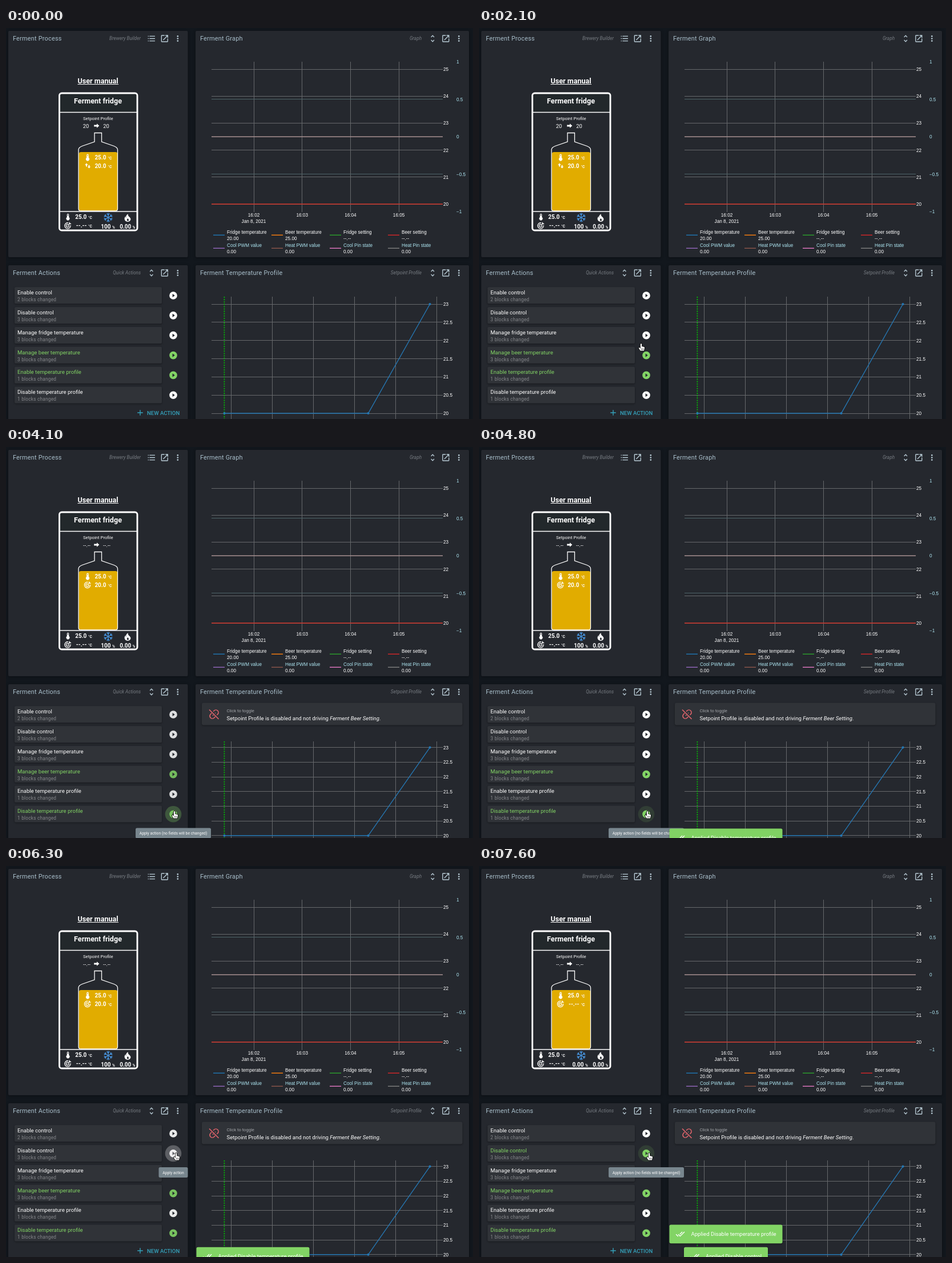
These frames come from a looping animation (818x684 px, 8 s). An HTML page with a canvas:

```html
<!DOCTYPE html>
<html lang="en">
<head>
<meta charset="utf-8">
<title>Ferment dashboard</title>
<style>
  html, body { margin: 0; width: 100%; height: 100%; overflow: hidden; background: #12171d; }
  canvas { display: block; }
</style>
</head>
<body>
<canvas id="stage" width="818" height="684"></canvas>
<script>
const ctx = document.getElementById('stage').getContext('2d');
const LOOP = 8000, STEP = 100;
const APPLY_PROFILE = 3900, APPLY_CONTROL = 6500, COOL_OFF = 6900;
const GREEN = '#82d465', CARD = '#25282e', ITEM = '#303338', PALE = '#a9bfcb', CYAN = '#aee6f2', GRID = '#66686b';
const ROBOTO = 'Roboto, sans-serif', ARIAL = '"Liberation Sans", Arial, sans-serif';

const ICONS = {
  open: 'M14 3V5H17.59L7.76 14.83L9.17 16.24L19 6.41V10H21V3M19 19H5V5H12V3H5C3.89 3 3 3.9 3 5V19A2 2 0 0 0 5 21H19A2 2 0 0 0 21 19V12H19Z',
  unfold: 'M12 5.83L15.17 9L16.58 7.59L12 3L7.41 7.59L8.83 9ZM12 18.17L8.83 15L7.42 16.41L12 21L16.59 16.41L15.17 15Z',
  list: 'M3 5h2v2H3zM3 11h2v2H3zM3 17h2v2H3zM7 5h14v2H7zM7 11h14v2H7zM7 17h14v2H7z',
  play: 'M2 12A10 10 0 1 0 22 12A10 10 0 1 0 2 12ZM10 16.5V7.5L16 12Z',
  thermometer: 'M15 13V5A3 3 0 0 0 9 5V13A5 5 0 1 0 15 13M12 4A1 1 0 0 1 13 5V8H11V5A1 1 0 0 1 12 4Z',
  right: 'M2 15V9H12V4L21 12L12 20V15Z',
  swap: 'M7 2L1 9h4v6h4V9h4zM17 22l6-7h-4V9h-4v6h-4z',
  checks: 'M18 7l-1.41-1.41-6.34 6.34 1.41 1.41zM22.24 5.59L11.66 16.17 7.48 12l-1.41 1.41L11.66 19l12-12zM.41 13.41L6 19l1.41-1.41L1.83 12z',
  fire: 'M13 2C7 6 8 10 8.5 13C7 12 7 10 7.2 8C4 11 4 14 4.3 16C5 20 8 22 12 22C17 22 20 19 19.8 15C19.5 10 12 9 13 2ZM12 20C9 19 10 16 13 13C13 15 15 16 15 18C15 19 14 20 12 20Z',
  link: 'M11 7H7a5 5 0 0 0 0 10h4M13 7h4a5 5 0 0 1 0 10h-4M8 12h8',
  plus: 'M19 13H13V19H11V13H5V11H11V5H13V11H19Z'
};
for (const name in ICONS) ICONS[name] = new Path2D(ICONS[name]);

const ARROW = new Path2D('M0 0V11L2.6 8.6L4.4 12.3L6 11.5L4.3 8H7.8Z');
const HAND = new Path2D('M-1.2 1Q0 -.8 1.2 1V5L5.6 6Q6.2 6.4 6 8L5 12.4H-1.5L-4 8.4Q-4.6 6.8 -3 7L-1.2 8.4Z');

const actions = [
  ['Enable control', 2], ['Disable control', 3], ['Manage fridge temperature', 3],
  ['Manage beer temperature', 3], ['Enable temperature profile', 1], ['Disable temperature profile', 1]
];
// row, hover start, hover end
const hovers = [[4, 2300, 2800], [5, 2900, 4900], [4, 5000, 5100], [3, 5200, 5300], [2, 5350, 5550], [1, 5700, 9000]];
// time, x, y of the pointer's hot spot
const route = [
  [900, 200, 12], [1200, 70, 120], [1400, 12, 260], [1700, 51, 372], [1800, 100, 412],
  [2100, 284, 552], [2200, 292, 585], [2400, 294, 604], [2700, 294, 604], [2900, 298, 622],
  [3100, 300, 637], [3200, 300, 637], [3300, 295, 637], [4800, 295, 637], [5000, 296, 606],
  [5200, 298, 567], [5500, 303, 535], [5600, 303, 522], [5800, 298, 502], [8000, 298, 502]
];

const clamp = v => Math.max(0, Math.min(1, v));
const crisp = v => Math.floor(v) + .5;
const rowY = i => 468 + 34.85 * i;

// CSS "ease": cubic-bezier(.25, .1, .25, 1)
function ease(x) {
  x = clamp(x);
  let lo = 0, hi = 1, s = x;
  for (let i = 0; i < 20; i++) {
    s = (lo + hi) / 2;
    const bx = .75 * s * (1 - s) + s ** 3;
    if (bx < x) lo = s; else hi = s;
  }
  return .3 * s * (1 - s) ** 2 + 3 * s * s * (1 - s) + s ** 3;
}

function text(str, x, y, size, color = '#fff', { style = '', font = ROBOTO, align = 'left', spacing = 0 } = {}) {
  ctx.font = `${style} ${size}px ${font}`;
  ctx.letterSpacing = spacing + 'px';
  ctx.textAlign = align;
  ctx.fillStyle = color;
  ctx.fillText(str, x, y);
  return ctx.measureText(str).width;
}

function box(x, y, w, h, r, fill, shadow = 0) {
  ctx.save();
  if (shadow) {
    ctx.shadowColor = 'rgba(0,0,0,.4)';
    ctx.shadowBlur = shadow;
    ctx.shadowOffsetY = 1;
  }
  ctx.beginPath();
  ctx.roundRect(x, y, w, h, r);
  ctx.fillStyle = fill;
  ctx.fill();
  ctx.restore();
}

function disc(x, y, r, fill) {
  ctx.beginPath();
  ctx.arc(x, y, r, 0, 7);
  ctx.fillStyle = fill;
  ctx.fill();
}

function line(points, color, width = 1, dash = []) {
  ctx.beginPath();
  points.forEach(([x, y]) => ctx.lineTo(x, y));
  ctx.strokeStyle = color;
  ctx.lineWidth = width;
  ctx.setLineDash(dash);
  ctx.stroke();
  ctx.setLineDash([]);
}
const hline = (y, x0, x1, color, width) => line([[x0, y], [x1, y]], color, width);
const vline = (x, y0, y1, color, width, dash) => line([[x, y0], [x, y1]], color, width, dash);

function icon(name, x, y, size, color) {
  ctx.save();
  ctx.translate(x - size / 2, y - size / 2);
  ctx.scale(size / 24, size / 24);
  ctx.fillStyle = color;
  ctx.fill(ICONS[name], 'evenodd');
  ctx.restore();
}

function targetIcon(x, y) {
  ctx.strokeStyle = '#fff';
  ctx.lineWidth = 1.3;
  for (const r of [5.1, 2.6]) {
    ctx.beginPath();
    ctx.arc(x - .5, y + .5, r, -.15, 4.9);
    ctx.stroke();
  }
  line([[x - .5, y + .5], [x + 4, y - 4]], '#fff', 1.3);
  line([[x + 2.6, y - 5.6], [x + 2.6, y - 2.6], [x + 5.6, y - 2.6]], '#fff', 1.3);
}

function snowflake(x, y) {
  ctx.save();
  ctx.translate(x, y);
  for (let i = 0; i < 6; i++) {
    line([[0, 0], [0, -8]], '#4a9be8', 1.2);
    line([[-2.5, -7], [0, -4.6], [2.5, -7]], '#4a9be8', 1.2);
    ctx.rotate(Math.PI / 3);
  }
  ctx.restore();
}

function card(x, y, w, title, kind, kindEnd, firstIcon) {
  box(x, y, w, y < 100 ? 396 : 300, 2, CARD, 5);
  text(title, x + 8, y + 17, 10.93, PALE, { spacing: .2 });
  text(kind, kindEnd, y + 16, 8.2, '#777c82', { style: 'italic', align: 'right' });
  const right = x + w - 17.7, cy = y + 13.5;
  icon(firstIcon, right - 46, cy, 16.4, '#b9ccd6');
  icon('open', right - 23, cy, 16.4, '#b9ccd6');
  for (const dy of [-4.1, 0, 4.1]) disc(right, cy + dy, 1.37, '#b9ccd6');
}

function reading(value, unit, x, y, unitX) {
  text(value, x, y, 10, '#fff', { style: 'bold', align: 'right' });
  text(unit, unitX, y, 6.5, '#fff', { style: 'bold' });
}

function drawProcess(t) {
  card(4, 5, 314.5, 'Ferment Process', 'Brewery Builder', 236, 'list');
  text('User manual', 161, 97, 12.6, '#fff', { style: 'bold', align: 'center' });
  hline(98.5, 125.5, 197, '#fff', 1);

  box(93, 113.5, 137, 34, 4, '#22282b');
  ctx.strokeStyle = '#fff';
  ctx.lineWidth = 2.9;
  ctx.beginPath();
  ctx.roundRect(93.5, 114, 136.5, 240, 4);
  ctx.stroke();
  hline(147.5, 94, 229.5, '#fff', 1.7);
  hline(321, 94, 229.5, '#fff', 1.7);
  text('Ferment fridge', 161, 132, 12.6, '#fff', { style: 'bold', align: 'center' });

  const driving = t < APPLY_PROFILE;
  const setpoint = driving ? '20' : '--.--';
  text('Setpoint Profile', 161.3, 160.5, 7.73, '#fff', { align: 'center' });
  text(setpoint, driving ? 140 : 141.5, 174.5, 9.4, '#fff', { align: 'center' });
  text(setpoint, driving ? 175.5 : 176.5, 174.5, 9.4, '#fff', { align: 'center' });
  icon('right', 159, 171, 11.5, '#fff');

  box(127.5, 217, 68, 103, 4, '#e1ac00');
  ctx.strokeStyle = '#fff';
  ctx.lineWidth = 1.3;
  ctx.stroke(new Path2D('M155 183.5H167.5V199L189 206.5Q195.5 209 195.5 213V316Q195.5 320 191.5 320H131Q127 320 127 316V213Q127 209 133.5 206.5L155 199Z'));

  icon('thermometer', 143, 226.5, 14.5, '#fff');
  if (driving) icon('swap', 143.2, 241, 11, '#fff'); else targetIcon(143, 241);
  reading('25.0', '°C', 175.5, 229.7, 178.5);
  reading(t < APPLY_CONTROL ? '20.0' : '--.--', '°C', 175.5, 244.5, 178.5);

  icon('thermometer', 108.5, 330.5, 14, '#fff');
  targetIcon(108.5, 345.3);
  reading('25.0', '°C', 141.3, 334.2, 144);
  reading('--.--', '°C', 141.3, 348.7, 144);
  snowflake(179, 331.5);
  icon('fire', 213, 332, 16.5, '#fff');
  reading(t < COOL_OFF ? '100' : '0.00', '%', 183.5, 351.3, 186);
  reading('0.00', '%', 219.3, 351.3, 221.5);
}

function drawGraph() {
  const label = (s, x, y, color, align) => text(s, x, y, 8.2, color, { font: ARIAL, align });
  card(332, 5, 479, 'Ferment Graph', 'Graph', 728, 'unfold');
  for (let i = 0; i < 4; i++) {
    const x = 434 + i * 84.7;
    vline(crisp(x), 59, 322, GRID);
    label('16:0' + (i + 2), x, 330.3, '#fff', 'center');
  }
  label('Jan 8, 2021', 434, 341.2, '#fff', 'center');
  for (let i = 0; i < 6; i++) {
    const y = 72 + i * 47.2;
    hline(crisp(y), 360, 765, GRID);
    label(String(25 - i), 766, y + 3, '#fff');
  }
  ['1', '0.5', '0', '−0.5', '−1'].forEach((s, i) => {
    const y = 59.3 + i * 65.45;
    if (i % 2) hline(crisp(y), 360, 765, '#4d6468');
    label(s, 789, y + 3, CYAN);
  });
  hline(190.3, 360, 765, '#a78f90', 1.5);
  hline(308, 360, 765, '#cf3328', 1.6);

  const legend = [
    ['Fridge temperature', '20.00', '#1f77b4'], ['Beer temperature', '25.00', '#ff7f0e'],
    ['Fridge setting', '--.--', '#2ca02c'], ['Beer setting', '--.--', '#d62728'],
    ['Cool PWM value', '0.00', '#9467bd'], ['Heat PWM value', '0.00', '#8c564b'],
    ['Cool Pin state', '0.00', '#e377c2'], ['Heat Pin state', '0.00', '#7f7f7f']
  ];
  legend.forEach(([name, value, color], i) => {
    const x = 363 + (i % 4) * 102, y = i < 4 ? 362.3 : 385.3;
    hline(y, x, x + 20, color, 1.4);
    label(name, x + 24, y - 2.3, i < 4 ? '#fff' : CYAN);
    label(value, x + 24, y + 8.7, '#fff');
  });
}

function drawBanner() {
  box(343, 447.5, 456.5, 39, 3, ITEM, 3);
  ctx.save();
  ctx.translate(364.5, 467.5);
  ctx.rotate(-Math.PI / 4);
  ctx.scale(.88, .88);
  ctx.translate(-12, -12);
  ctx.strokeStyle = '#e0646c';
  ctx.lineWidth = 1.9;
  ctx.stroke(ICONS.link);
  ctx.restore();
  line([[357, 459.5], [373, 475.5]], ITEM, 4);
  line([[356, 459.5], [372.5, 476]], '#e0646c', 1.7);
  text('Click to toggle', 386.5, 463.7, 7.65, '#a3a6aa');
  let x = 386.5;
  x += text('Setpoint Profile is disabled and not driving ', x, 477.7, 9.56);
  x += text('Ferment Beer Setting', x, 477.7, 9.56, '#fff', { style: 'italic' });
  text('.', x, 477.7, 9.56);
}

function drawProfile(t) {
  card(332, 415, 479, 'Ferment Temperature Profile', 'Setpoint Profile', 728, 'unfold');
  const disabled = t >= APPLY_PROFILE;
  if (disabled) drawBanner();
  const top = disabled ? 525.6 : 483, bottom = disabled ? 679.8 : 674;
  const gridTop = disabled ? 515 : 470;
  for (let i = 0; i < 6; i++) vline(crisp(394.2 + 72 * i), gridTop, 684, GRID);
  for (let i = 0; i < 7; i++) {
    const y = top + (bottom - top) * i / 6;
    hline(crisp(y), 360, 765, GRID);
    text(String(23 - i / 2), 766, y + 3, 8.2, '#fff', { font: ARIAL });
  }
  vline(382.4, gridTop, 684, '#00c800', 1.6, [2.05, 2.05]);
  const points = [[382.5, bottom], [634.5, bottom], [742.5, top]];
  line(points, '#2577b3', 1.4);
  for (const [x, y] of points) disc(x, y, 2.1, '#2577b3');
}

function isApplied(row, t) {
  if (row === 1) return t >= APPLY_CONTROL;
  if (row === 4) return t < APPLY_PROFILE;
  if (row === 5) return t >= APPLY_PROFILE;
  return row === 3;
}

const hoverAlpha = ([, start, end], t) => clamp(Math.min((t - start + 50) / 200, 1 - (t - end) / 200));

// Buttons are briefly dimmed while an action runs.
function buttonAlpha(t) {
  const dip = (start, end) => clamp(Math.min((t - start) / 300, (end - t) / 400));
  return 1 - .3 * Math.max(dip(3600, 4300), dip(6200, 7000));
}

function pressGlow(row, t) {
  const pulse = (start, end) => t >= start && t <= end ? 1 - ((t - start) / (end - start)) ** 3 : 0;
  const strength = isApplied(row, t) ? .26 : .13;
  if (row === 5) return strength * pulse(3500, 4300);
  return row === 1 ? strength * pulse(6200, 7300) : 0;
}

function drawActions(t) {
  card(4, 415, 314.5, 'Ferment Actions', 'Quick Actions', 236, 'unfold');
  actions.forEach(([name, count], i) => {
    const y = rowY(i), on = isApplied(i, t);
    box(15, y - 14.7, 258, 29, 2, ITEM, 3);
    text(name, 20, y - 2, 9.56, on ? GREEN : '#fff');
    text(count + ' blocks changed', 20, y + 10, 8.2, '#85878b', { spacing: .27 });

    const color = on ? GREEN : '#ffffff';
    const halo = Math.max(0, ...hovers.filter(h => h[0] === i).map(h => hoverAlpha(h, t)));
    ctx.globalAlpha = halo * (.13 + pressGlow(i, t));
    disc(293, y, 14.3, color);
    ctx.globalAlpha = buttonAlpha(t);
    icon('play', 293, y, 16.4, color);
    ctx.globalAlpha = 1;
  });
  icon('plus', 235, 673, 16.4, '#35a3bd');
  text('NEW ACTION', 247, 676.5, 9.56, '#35a3bd', { style: '500' });
}

function drawTooltips(t) {
  for (const hover of hovers) {
    const alpha = hoverAlpha(hover, t);
    if (!alpha) continue;
    const on = isApplied(hover[0], t);
    const width = on ? 132 : 51;
    const y = rowY(hover[0]) + 33.2 - 8 * (1 - alpha);
    ctx.globalAlpha = alpha;
    box(293 - width / 2, y - 9, width, 18, 2.5, '#78868e');
    text(on ? 'Apply action (no fields will be changed)' : 'Apply action', 293, y + 2.5, 6.83, '#fafafa', { align: 'center' });
    ctx.globalAlpha = 1;
  }
}

function toast(message, width, y, alpha) {
  const x = 432.5 - width / 2;
  ctx.globalAlpha = alpha;
  box(x, y, width, 32.7, 2.7, GREEN, 3);
  icon('checks', x + 19, y + 16.3, 16.4, '#fff');
  text(message, x + 38, y + 19.5, 9.56);
  ctx.globalAlpha = 1;
}

function drawToasts(t) {
  const rest = 666.8;
  const first = ease((t - 3950) / 1000), second = ease((t - 6535) / 1000);
  if (second) toast('Applied Disable control', 147, rest + 50 * (1 - second), second);
  if (first) toast('Applied Disable temperature profile', 198, rest + 50 * (1 - first) - 39.3 * second, first);
}

function drawPointer(t) {
  const next = route.findIndex(p => p[0] > t);
  if (next < 1) return;
  const [t0, x0, y0] = route[next - 1], [t1, x1, y1] = route[next];
  const k = (t - t0) / (t1 - t0);
  const arrow = t < 2100 || (t >= 5400 && t < 5700);
  const shape = arrow ? ARROW : HAND;
  ctx.save();
  ctx.translate(x0 + (x1 - x0) * k, y0 + (y1 - y0) * k);
  ctx.fillStyle = '#fff';
  ctx.strokeStyle = '#000';
  ctx.lineWidth = 1.6;
  ctx.lineJoin = 'round';
  ctx.stroke(shape);
  ctx.fill(shape);
  if (!arrow) {
    ctx.lineWidth = .6;
    ctx.stroke(new Path2D('M.2 8.5V11M2 8.5V11M3.8 8.5V11'));
  }
  ctx.restore();
}

function render(now) {
  const t = Math.floor((now % LOOP) / STEP) * STEP;
  ctx.fillStyle = '#12171d';
  ctx.fillRect(0, 0, 818, 684);
  drawProcess(t);
  drawGraph();
  drawActions(t);
  drawProfile(t);
  drawTooltips(t);
  drawToasts(t);
  drawPointer(t);
}

const begin = performance.now();
function tick() {
  render(performance.now() - begin);
  requestAnimationFrame(tick);
}
tick();
</script>
</body>
</html>
```
